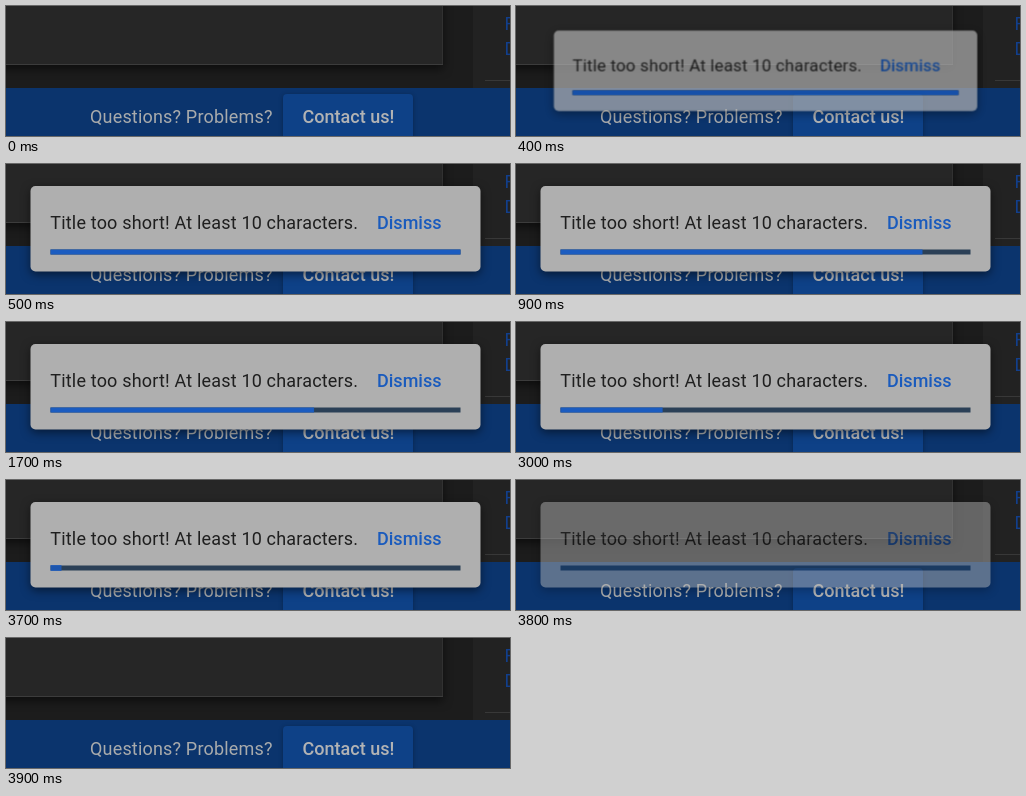
An HTML page for the animation above (4000 ms loop, 504 px wide and 130 px high).

```html
<!DOCTYPE html>
<html lang="en">
<head>
<meta charset="utf-8">
<title>Snackbar with countdown</title>
<style>
  html, body { margin: 0; width: 100%; height: 100%; overflow: hidden; background: #1c1c1c; }
  svg { display: block; width: 504px; height: 130px; }
  text { font: 400 18px Roboto, Arial, sans-serif; letter-spacing: .18px; }
  .strong { font-weight: 500; letter-spacing: 0; }
  .card { filter: drop-shadow(0 4px 5px rgba(0, 0, 0, .55)); }
  .button { filter: drop-shadow(0 1px 2px rgba(0, 0, 0, .3)); }
  .sheet { filter: drop-shadow(0 3px 5px rgba(0, 0, 0, .5)); }
  #toast { transform-origin: 249.5px 65px; opacity: 0; }
  #fill { transform-box: fill-box; transform-origin: 0 50%; }
</style>
</head>
<body>
<svg viewBox="0 0 504 130" xmlns="http://www.w3.org/2000/svg">
  <!-- page -->
  <rect width="504" height="130" fill="#1c1c1c"/>
  <rect x="467" width="37" height="82" fill="#222"/>
  <rect x="479" y="74" width="25" height="1" fill="#383838"/>
  <g fill="#123f8c">
    <text x="498.5" y="24">F</text>
    <text x="498.5" y="49">D</text>
  </g>
  <g class="card">
    <rect x="-20" y="-20" width="457" height="79" fill="#3c3c3c"/>
    <rect x="-20" y="-20" width="456.5" height="78" fill="#262626"/>
  </g>

  <!-- footer -->
  <rect y="82" width="504" height="48" fill="#0b346d"/>
  <rect class="button" x="277" y="88" width="130" height="50" rx="4" fill="#0e4187"/>
  <text x="84" y="117" fill="#a9abac">Questions? Problems?</text>
  <text class="strong" x="296.5" y="117" fill="#b2b3b4">Contact us!</text>

  <!-- snackbar -->
  <g id="toast">
    <rect class="sheet" x="24.5" y="22" width="450" height="85.5" rx="5" fill="#afafaf"/>
    <text x="44.3" y="65" fill="#1f1f1f">Title too short! At least 10 characters.</text>
    <text class="strong" x="371" y="65" fill="#1a5bbd">Dismiss</text>
    <rect x="44.5" y="85.5" width="410" height="5" fill="#2b4057"/>
    <rect id="fill" x="44.5" y="85.5" width="410" height="5" fill="#1b5cc0"/>
  </g>
</svg>
<script>
  const LOOP = 4000, TICK = 100;

  // [time, opacity, scale], each held until the next
  const toastSteps = [
    [0, 0, .8], [300, .2, .84], [400, .72, .941],
    [500, 1, 1], [3800, .5, 1], [3900, 0, 1], [LOOP, 0, 1]
  ];

  // [time, remaining share], stepped once per tick in between
  const fillSteps = [
    [0, 1], [500, 1], [900, .883], [1700, .643],
    [3000, .2495], [3700, .027], [3800, 0], [LOOP, 0]
  ];

  function play(id, frames) {
    document.getElementById(id).animate(frames, { duration: LOOP, iterations: Infinity });
  }

  play('toast', toastSteps.map(([time, opacity, scale]) => ({
    offset: time / LOOP, opacity, transform: `scale(${scale})`, easing: 'steps(1)'
  })));

  play('fill', fillSteps.map(([time, share], i) => {
    const end = (fillSteps[i + 1] || [time + TICK])[0];
    return {
      offset: time / LOOP,
      transform: `scaleX(${share})`,
      easing: `steps(${(end - time) / TICK})`
    };
  }));
</script>
</body>
</html>
```
